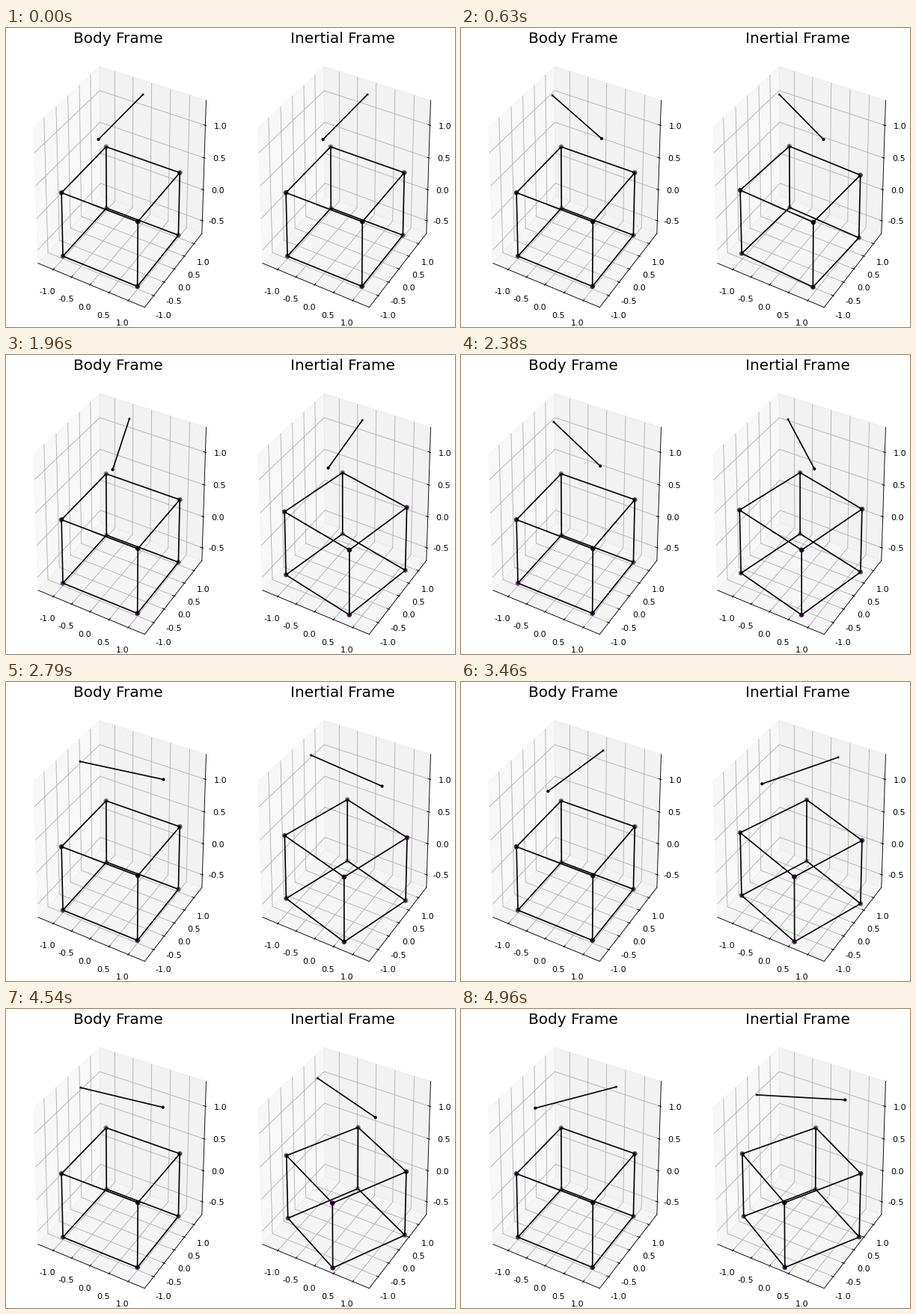
Animation of 600 by 400 pixels, one loop 5 s. Source, as a matplotlib script:

```python
from itertools import product

import matplotlib.pyplot as plt
import numpy as np
from matplotlib.animation import FuncAnimation
from matplotlib.collections import LineCollection

FRAMES = 120
LOOP_MS = 5000
CUBE_STEP = -0.2505     # degrees per frame, inertial frame
ROD_STEP = 4.2375       # degrees per frame, relative to the cube

UNIT = 0.3667           # length 1 in x or y, as a share of the box
HALF = 25 / 48          # panes reach slightly past the limits
TICK_OUT, TICK_IN, LABEL_GAP = 1 / 120, 1 / 60, 0.095
CUBE_COLOR = (0.24, 0.02, 0.28)
ROD_COLOR = (0, 0, 0)

AZIM, ELEV = np.radians([-60, 30])
NORMAL = np.array([np.cos(AZIM) * np.cos(ELEV),
                   np.sin(AZIM) * np.cos(ELEV), np.sin(ELEV)])
RIGHT = np.array([-np.sin(AZIM), np.cos(AZIM), 0])
UP = np.cross(NORMAL, RIGHT)


def project(points, left):
    """Perspective view of box points as stage pixels, plus nearness."""
    points = np.asarray(points, float)
    near = points @ NORMAL
    x = left + 154.1 + 1578.4 * (points @ RIGHT) / (10 - near)
    y = 206.8 - 1994.6 * (points @ UP) / (10 - near)
    return np.stack([x, y], axis=-1), near


def spin(points, degrees):
    c, s = np.cos(np.radians(degrees)), np.sin(np.radians(degrees))
    return points @ np.array([[c, s, 0], [-s, c, 0], [0, 0, 1]])


def shade(color, near):
    """Fade points from opaque (nearest) to faint (farthest)."""
    alpha = 0.3 + 0.7 * (near - near.min()) / (np.ptp(near) + 1e-12)
    return [(*color, a) for a in alpha]


fig = plt.figure(figsize=(7.5, 5), dpi=80, facecolor="white")
ax = fig.add_axes([0, 0, 1, 1])
ax.set(xlim=(0, 600), ylim=(400, 0))
ax.axis("off")

CUBE = np.array([(x * UNIT, y * UNIT, z)
                 for x, y, z in product((-1, 1), (-1, 1), (-0.5, 0))])
EDGES = [(i, i | bit) for i in range(8) for bit in (1, 2, 4) if not i & bit]
ROD = np.array([(0, -UNIT, 0.5), (0, UNIT, 0.5)])


def draw_box(left, title):
    h = HALF
    panes = [
        (0.95, [(-h, -h, -h), (-h, h, -h), (-h, h, h), (-h, -h, h)]),
        (0.90, [(-h, h, -h), (h, h, -h), (h, h, h), (-h, h, h)]),
        (0.925, [(-h, -h, -h), (h, -h, -h), (h, h, -h), (-h, h, -h)]),
    ]
    for grey, corners in panes:
        xy, _ = project(corners, left)
        ax.fill(*xy.T, facecolor=str(grey), edgecolor=str(grey),
                alpha=0.5, lw=1, zorder=0)

    def line(points, color):
        xy, _ = project(points, left)
        ax.plot(*xy.T, color=color, lw=0.8, zorder=1,
                solid_capstyle="butt" if color != "k" else "projecting")

    def label(point, value):
        xy, _ = project(point, left)
        ax.text(*xy, f"{value:.1f}", size=10, ha="center", va="top")

    out, inn, gap = h + TICK_OUT, h - TICK_IN, h + LABEL_GAP
    flat = [(v, v * UNIT) for v in (-1.0, -0.5, 0.0, 0.5, 1.0)]
    tall = [(v, v / 2 - 1 / 6) for v in (-0.5, 0.0, 0.5, 1.0)]

    for _, t in flat:
        line([(t, -h, -h), (t, h, -h), (t, h, h)], "#b0b0b0")
        line([(h, t, -h), (-h, t, -h), (-h, t, h)], "#b0b0b0")
    for _, t in tall:
        line([(-h, -h, t), (-h, h, t), (h, h, t)], "#b0b0b0")

    line([(-h, -h, -h), (h, -h, -h)], "k")
    line([(h, -h, -h), (h, h, -h)], "k")
    line([(h, h, -h), (h, h, h)], "k")

    for v, t in flat:
        line([(t, -out, -h), (t, -inn, -h)], "k")
        label((t, -gap, -gap), v)
        line([(out, t, -h), (inn, t, -h)], "k")
        label((gap, t, -gap), v)
    for v, t in tall:
        line([(out, h, t), (inn, h, t)], "k")
        label((gap, gap, t), v)

    ax.text(left + 150, 20, title, size=18, ha="center", va="baseline")


class Body:
    """Wire cube with a spinning rod above it."""

    def __init__(self, left, title, cube_step, rod_step):
        self.left = left
        self.steps = cube_step, rod_step
        draw_box(left, title)
        self.dots = [ax.scatter(np.zeros(len(p)), np.zeros(len(p)), s=size,
                                lw=1.5, zorder=2)
                     for p, size in ((CUBE, 20), (ROD, 5))]
        self.wires = LineCollection([], colors="k", linewidths=1.5, zorder=3,
                                    capstyle="projecting")
        ax.add_collection(self.wires, autolim=False)

    def pose(self, n):
        segments = []
        parts = zip((CUBE, ROD), self.steps, self.dots,
                    (EDGES, [(0, 1)]), (CUBE_COLOR, ROD_COLOR))
        for points, step, dots, edges, color in parts:
            xy, near = project(spin(points, step * n), self.left)
            order = np.argsort(near)
            colors = shade(color, near[order])
            dots.set_offsets(xy[order])
            dots.set_facecolor(colors)
            dots.set_edgecolor(colors)
            segments += [xy[list(edge)] for edge in edges]
        self.wires.set_segments(segments)


bodies = [
    Body(0, "Body Frame", 0, ROD_STEP),
    Body(300, "Inertial Frame", CUBE_STEP, ROD_STEP + CUBE_STEP),
]


def update(n):
    for body in bodies:
        body.pose(n)
    return []


anim = FuncAnimation(fig, update, frames=FRAMES, interval=LOOP_MS / FRAMES,
                     repeat=True, repeat_delay=0, blit=False)
plt.show()
```
